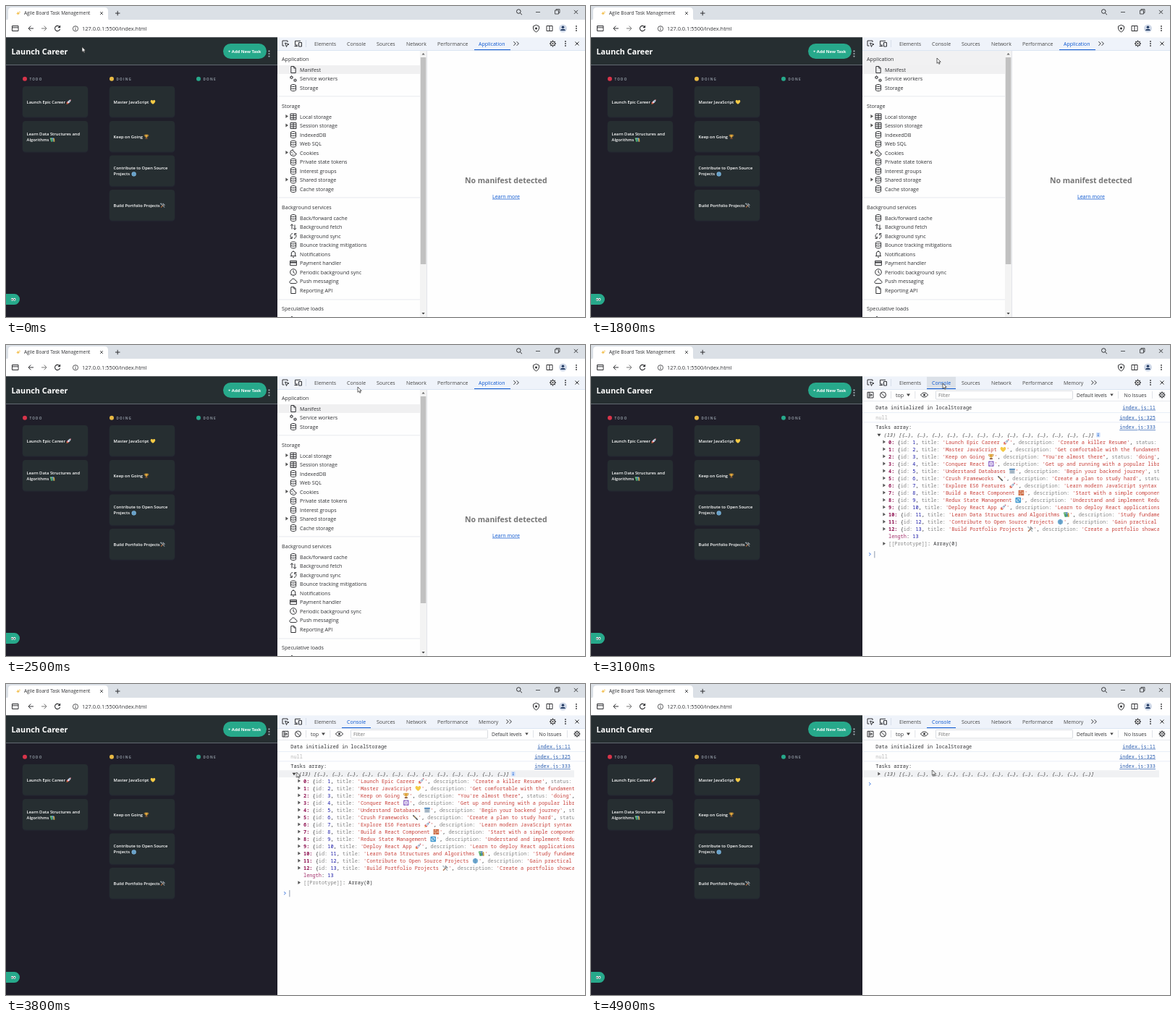
An HTML page for the animation above (5.1 s loop, 800 by 430 pixels).

```html
<!DOCTYPE html>
<html lang="en">
<head>
<meta charset="utf-8">
<title>Agile Board Task Management</title>
<style>
html, body { margin: 0; width: 100%; height: 100%; overflow: hidden; background: #fefefe; }
svg { display: block; width: 800px; height: 430px; }
text { font-family: "Open Sans", "Noto Sans", sans-serif; white-space: pre; }
.mono { font-family: "Noto Sans Mono", "DejaVu Sans Mono", monospace; }
</style>
</head>
<body>
<svg id="stage" viewBox="0 0 800 430" xmlns="http://www.w3.org/2000/svg"></svg>
<script>
const LOOP = 5100;
const INK = '#303134', BLUE = '#0b57d0', GREEN = '#27a98b', RULE = '#e1e4ea';
const MONO = 6.93, CELL = MONO * 0.6;
const SPLIT = 375, TOP = 43.5;

// Drawing helpers
const rect = (x, y, w, h, fill, extra = '') => `<rect x="${x}" y="${y}" width="${w}" height="${h}" fill="${fill}" ${extra}/>`;
const dot = (x, y, r, fill, extra = '') => `<circle cx="${x}" cy="${y}" r="${r}" fill="${fill}" ${extra}/>`;
const line = (d, color = INK, w = 1) => `<path d="${d}" fill="none" stroke="${color}" stroke-width="${w}"/>`;
const shape = (d, fill = INK) => `<path d="${d}" fill="${fill}"/>`;
const at = (x, y, body, scale = 1) => `<g transform="translate(${x} ${y}) scale(${scale})">${body}</g>`;
const text = (x, y, s, size = 7, fill = INK, extra = '') =>
  `<text x="${x}" y="${y}" font-size="${size}" fill="${fill}" ${extra}>${s}</text>`;
const mono = (x, y, s, fill = INK, extra = '') => text(x, y, s, MONO, fill, 'class="mono" ' + extra);
const span = (s, fill, extra = '') => `<tspan fill="${fill}" ${extra}>${s}</tspan>`;
const group = (id, body) => `<g id="${id}">${body}</g>`;

// Line icons, centred on 0,0
const icons = {
  doc: line('M-3-4.5H1L3.2-2.2V4.5H-3.2V-4.5M.8-4.3V-2H3'),
  db: line('M-3.6-3C-3.6-5 3.6-5 3.6-3V3C3.6 5-3.6 5-3.6 3ZM-3.6-3C-3.6-1 3.6-1 3.6-3M-3.6 0C-3.6 2 3.6 2 3.6 0'),
  table: line('M-4-4H4V4H-4ZM-4-1.4H4M-4 1.4H4M0-4V4'),
  gears: line('M-2.5-4.2V.6M-4.9-1.8H-.1M-4.2-3.5L-.8-.1M-.8-3.5L-4.2-.1', INK, .9) + dot(-2.5, -1.8, 1.5, '#fefefe', `stroke="${INK}"`) +
    line('M2.5 0V4.6M.2 2.3H4.8M.9.7L4.1 3.9M4.1.7L.9 3.9', INK, .9) + dot(2.5, 2.3, 1.3, '#fefefe', `stroke="${INK}"`),
  cookie: line('M-.5-4.3A4.4 4.4 0 1 0 4.3 1C2.6 1 2 0 2-1C.5-1-.5-2-.5-4.3Z') + dot(-2, -.6, .7, INK) + dot(-.6, 2, .7, INK) + dot(2, 2, .6, INK),
  updown: line('M-2 3V-3.6M-4-1.7L-2-3.8L0-1.7M2-3V3.6M0 1.7L2 3.8L4 1.7'),
  sync: line('M-1-3.5C-5-2.5-4.5 2-2 3.3M-4.5 3.3H-1.7V.7M1 3.5C5 2.5 4.5-2 2-3.3M4.5-3.3H1.7V-.7'),
  bell: line('M-4 2.7H4M-2.7 2.7V-1C-2.7-4.4 2.7-4.4 2.7-1V2.7M-.9 4.3H.9M0-4.7V-3.5'),
  card: line('M-4.4-3.2H4.4V3.2H-4.4Z') + rect(-4.4, -1.8, 8.8, 1.8, INK),
  clock: dot(0, 0, 4.3, 'none', `stroke="${INK}"`) + line('M0-2.6V.2L1.9 1.7'),
  cloud: line('M-3 3.1C-6 3-5.6-.7-3-.9C-2.4-4.3 2.3-4.2 2.8-.8C6-.6 5.5 3.1 3 3.1Z'),
  gear: line('M0-4.4V4.4M-4.4 0H4.4M-3.1-3.1L3.1 3.1M3.1-3.1L-3.1 3.1', INK, 1.4) + dot(0, 0, 2.9, '#fefefe', `stroke="${INK}"`) + dot(0, 0, 1.1, INK),
  kebab: [-3, 0, 3].map(y => dot(0, y, .9, INK)).join(''),
  close: line('M-2.5-2.5L2.5 2.5M2.5-2.5L-2.5 2.5'),
  more: line('M-3.6-2.8L-.8 0L-3.6 2.8M.6-2.8L3.4 0L.6 2.8'),
  eye: line('M-5 0C-2.5-4 2.5-4 5 0C2.5 4-2.5 4-5 0Z') + dot(0, 0, 1.5, INK),
  clear: dot(0, 0, 4, 'none', `stroke="${INK}"`) + line('M-2.8-2.8L2.8 2.8'),
  right: shape('M-1.6-2.4L2-0L-1.6 2.4Z', '#555'),
  down: shape('M-2.5-1.6H2.5L0 2Z', '#444')
};
const icon = (name, x, y, scale) => at(x, y, icons[name], scale);

// Pictograms in a box of 8 by 8, centred on 0,0
const emojis = {
  rocket: shape('M-3.8 1L-1.2-1L1 1.4L-1.4 3.6Z', '#d8394d') + shape('M-2.2.8C-1-2 1-3.6 3.8-3.8C3.7-1 2.2 1-.8 2.2Z', '#d3dbe4') +
    shape('M2-3.6L3.8-3.8L3.6-2Z', '#d8394d') + dot(1.3, -1.2, .8, '#4a86b8') + shape('M-3.8 3.8L-2.7 1.4L-1.4 2.7Z', '#f4a52e'),
  heart: shape('M0 3.7C-6-.2-3.7-3.4-1.8-3.2Q-.5-3.1 0-1.7Q.5-3.1 1.8-3.2C3.7-3.4 6-.2 0 3.7Z', '#f5ca45'),
  trophy: line('M-2-2.7H-3.5Q-3.4 0-1.4.2M2-2.7H3.5Q3.4 0 1.4.2', '#c58a35', .8) + shape('M-2.2-3.6H2.2Q2.2.6.6 1V2.4H-.6V1Q-2.2.6-2.2-3.6Z', '#dfa63c') + rect(-2, 2.2, 4, 1.6, '#7b4b32'),
  books: shape('M-4-2.7L-1-3.5L1 2.9L-2 3.6Z', '#49a765') + shape('M-1-3L1.6-3.6L3.4 2L.8 3.3Z', '#3c79b8') + shape('M1.5-2L3.5-2.4L4 3L2 3.5Z', '#caa344') + line('M-3-1.3L-.8-1.9M0-1.4L2-2', '#f2ead0', .7),
  globe: dot(0, 0, 3.6, '#8fc3e6') + line('M-3.6 0H3.6M0-3.6V3.6M-3-1.9Q0-1 3-1.9M-3 1.9Q0 1 3 1.9M0-3.6Q-3.6 0 0 3.6M0-3.6Q3.6 0 0 3.6', '#4482ae', .5),
  tools: line('M-2.8 3.3L1.7-1.6', '#a8663e', 1.4) + line('M0-3.2L3.4.1', '#8b98a2', 1.8) + line('M-2.5-2.5L3.2 3.3', '#9caab2', 1.2) + dot(-2.8, -2.8, 1, '#b4c0c7'),
  atom: rect(-3.8, -3.8, 7.6, 7.6, '#8d67c8', 'rx="1"') + [30, 90, 150].map(a => `<ellipse rx="3.1" ry="1.2" fill="none" stroke="#fff" stroke-width=".6" transform="rotate(${a})"/>`).join(''),
  cabinet: rect(-3.8, -3.4, 7.6, 7, '#c3d1dd', 'rx=".6"') + rect(-3.8, -3.4, 7.6, 1.8, '#4f8abf') + line('M-2.8 0H2.8M-2.8 2H2.8', '#728594', .7),
  pen: line('M-2.9-2.9L2.5 2.5', '#3e4246', 1.4) + shape('M1.5 3L3 1.5L3.8 3.8Z', '#3e4246') + line('M-1-1L.3.3', '#bc9650', 1.4),
  bricks: rect(-3.8, -3.6, 7.6, 7.2, '#c9613b') + line('M-3.8-1.2H3.8M-3.8 1.2H3.8M-1-3.6V-1.2M2-1.2V1.2M-1 1.2V3.6', '#f1cfb6', .7),
  cycle: rect(-3.8, -3.8, 7.6, 7.6, '#459bd0', 'rx="1"') + line('M-2-1V1.7H1M2 1V-1.7H-1', '#fff', .9),
  spark: shape('M-.5-3.5L.5-.8L3.3.2L.5 1.2L-.5 3.8L-1.4 1.2L-4 .2L-1.4-.8Z', '#f2bc45') + shape('M2.5-4L3-2.8L4.2-2.3L3-1.8L2.5-.6L2-1.8L.9-2.3L2-2.8Z', '#f2bc45')
};
const emoji = (name, x, y, scale = 1) => at(x, y, emojis[name], scale);

function browser() {
  return rect(0, 0, 800, 20, '#dbe0e6') + shape('M0 20Q3 20 3 16V7Q3 2 8 2H136Q141 2 141 7V16Q141 20 144 20Z', '#fff') +
    rect(0, 19, 800, 25, '#fff') + emoji('spark', 17, 10, .75) + text(25, 12.4, 'Agile Board Task Management', 6.5) +
    icon('close', 132, 10, .8) + line('M151 10H157.5M154.2 6.8V13.2') +
    dot(708.3, 7.5, 2.8, 'none', `stroke="${INK}"`) + line('M710.3 9.6L713 12.2') +
    line('M732 8.5H738M758.5 6H763.5V11H758.5ZM760 6V4.5H765V9.5H763.5', INK, .8) + icon('close', 787.5, 8.3) +
    line('M8.5 27.5H17V34.5H8.5ZM8.5 29.8H17') + line('M38 31H31M34.3 27.6L31 31L34.3 34.4') +
    line('M49 31H56M52.7 27.6L56 31L52.7 34.4', '#777') + line('M74 28.8A3.6 3.6 0 1 0 74.6 32M74.6 27V29.6H72', INK, 1.1) +
    dot(96, 31.3, 3.6, 'none', `stroke="${INK}" stroke-width=".8"`) + line('M96 30.8V33.4M96 28.9V29.8', INK, .9) +
    text(105, 34, '127.0.0.1:5500/index.html', 7.4) +
    line('M732.5 26.3L736.5 28V31Q736.3 34.3 732.5 36Q728.7 34.3 728.5 31V28Z') + dot(732.5, 31, 1.5, INK) +
    line('M747 27.5H755V34.5H747ZM751 27.5V34.5') + dot(769.5, 31, 5.5, '#d0d9e8') + dot(769.5, 29.3, 1.8, '#273f66') +
    shape('M765.8 34Q766.5 31.8 769.5 31.8Q772.5 31.8 773.2 34Z', '#273f66') + icon('kebab', 788, 31);
}

const cards = [
  [23, 111, ['Launch Epic Career'], 'rocket', 86.5],
  [23, 159, ['Learn Data Structures and', 'Algorithms'], 'books', 64],
  [143, 111, ['Master JavaScript'], 'heart', 203],
  [143, 159, ['Keep on Going'], 'trophy', 194],
  [143, 206.5, ['Contribute to Open Source', 'Projects'], 'globe', 176.7],
  [143, 254, ['Build Portfolio Projects'], 'tools', 216.5]
];

function card([x, y, lines, pic, picX]) {
  const top = y + 21.5 - (lines.length - 1) * 4.2;
  return rect(x - .5, y + .8, 91, 43, '#222630', 'rx="4.5"') + rect(x, y, 90, 42.5, '#262e31', 'rx="4"') +
    lines.map((s, i) => text(x + 5.6, top + 2.2 + i * 8.4, s, 5.8, '#fff', 'font-weight="600"')).join('') +
    emoji(pic, picX, top + (lines.length - 1) * 8.4 + .2, .85);
}

function board() {
  const columns = [[26, 'TODO', '#d8344a'], [146, 'DOING', '#e8b944'], [266, 'DONE', GREEN]];
  return rect(0, TOP, SPLIT, 430 - TOP, '#1f1e29') + rect(0, TOP, SPLIT, 81 - TOP, '#262e31') + rect(0, 81, SPLIT, 1, '#626970') +
    text(7.5, 66.6, 'Launch Career', 10.8, '#fff', 'font-weight="700"') +
    rect(300, 52, 60, 21, GREEN, 'rx="10.5"') + text(307, 64.7, '+ Add New Task', 5.85, '#fff', 'font-weight="700"') +
    [62.4, 66, 69.6].map(y => dot(363.5, y, 1.1, '#a3adb5')).join('') +
    columns.map(([x, s, c]) => dot(x, 100.7, 3, c) +
      text(x + 6.5, 102.5, s, 4.6, '#8b949e', 'font-weight="700" letter-spacing="1.2"')).join('') +
    cards.map(card).join('') + shape('M0 398H11.5A7.5 7.5 0 0 1 11.5 413H0Z', GREEN) +
    [8.6, 11.8].map(x => `<ellipse cx="${x}" cy="405.7" rx="1.6" ry="2" fill="#fff"/>` + dot(x - .2, 405.9, .9, '#263d3a')).join('');
}

function tabBar(tabs, active, from, to, moreX) {
  return tabs.map(([x, s]) => text(x, 54.8, s, 7, s === active ? BLUE : '#474747')).join('') +
    rect(from, 60, to - from, 1, BLUE) + icon('more', moreX, 52);
}
const commonTabs = [[426, 'Elements'], [471, 'Console'], [512, 'Sources'], [553, 'Network'], [596, 'Performance']];

function toolFrame() {
  const width = 800 - SPLIT;
  return rect(SPLIT, TOP, width, 430 - TOP, '#fefefe') + rect(SPLIT, TOP, width, 61 - TOP, '#eff3fa') + rect(SPLIT, 61, width, .8, '#d3dfef') +
    line('M389 50V48H382V55H384.5M385.5 51L391 53L388.5 54L387.5 56.5Z') + line('M407 48.3H399.5V54H403M398.5 55.5H403M404.5 50.5H408.5V56H404.5Z') +
    rect(414, 47, .7, 10, '#cdd5e2') + icon('gear', 755.5, 52) + icon('kebab', 773, 52) + icon('close', 789, 52);
}

const sections = [
  ['Application', 73, ['doc Manifest', 'gears Service workers', 'db Storage']],
  ['Storage', 138, ['table+ Local storage', 'table+ Session storage', 'db IndexedDB', 'db Web SQL', 'cookie+ Cookies',
    'db Private state tokens', 'db Interest groups', 'db+ Shared storage', 'db Cache storage']],
  ['Background services', 278, ['db Back/forward cache', 'updown Background fetch', 'sync Background sync', 'db Bounce tracking mitigations',
    'bell Notifications', 'card Payment handler', 'clock Periodic background sync', 'cloud Push messaging', 'doc Reporting API']],
  ['Speculative loads', 418, ['updown ']]
];

function section([title, y, items]) {
  return text(381, y + 2.6, title, 7.2, INK, 'font-weight="500"') + items.map((item, i) => {
    const [, kind, opens, label] = item.match(/^(\w+)(\+?) (.*)$/), rowY = y + 15 + i * 12.5;
    return (opens ? icon('right', 388, rowY - .5) : '') + icon(kind, 397, rowY) + text(406, rowY + 2.6, label, 7.15);
  }).join('');
}

function applicationPanel() {
  const width = 572 - SPLIT;
  return tabBar([...commonTabs, [653, 'Application']], 'Application', 647, 697, 705) +
    rect(SPLIT, 82, width, 12, '#f0f0f1') + group('headHover', rect(SPLIT, 62, width, 20, '#f1f1f2')) +
    [124.5, 264.5, 405.5].map(y => rect(SPLIT, y, width, .8, RULE)).join('') + sections.map(section).join('') +
    rect(572, 62, 9, 368, '#f3f3f3') + rect(572.8, 71, 7.5, 286, '#c1c1c1') +
    shape('M574.5 67.5H578.7L576.6 65Z', '#666') + shape('M574.5 424H578.7L576.6 426.5Z', '#444') + rect(581, 62, .8, 368, '#dcdfe4') +
    text(634, 244.8, 'No manifest detected', 10.5, '#757575', 'font-weight="700"') +
    text(672, 265.7, 'Learn more', 7, BLUE, 'text-decoration="underline"');
}

const tasks = [
  ['Launch Epic Career', 'rocket', "'Create a killer Resume'"],
  ['Master JavaScript', 'heart', "'Get comfortable with the fundamentals'"],
  ['Keep on Going', 'trophy', '"You\'re almost there"', "'doing'"],
  ['Conquer React', 'atom', "'Get up and running with a popular library'"],
  ['Understand Databases', 'cabinet', "'Begin your backend journey'"],
  ['Crush Frameworks', 'pen', "'Create a plan to study hard'"],
  ['Explore ES6 Features', 'rocket', "'Learn modern JavaScript syntax and features'"],
  ['Build a React Component', 'bricks', "'Start with a simple component'"],
  ['Redux State Management', 'cycle', "'Understand and implement Redux'"],
  ['Deploy React App', 'rocket', "'Learn to deploy React applications'"],
  ['Learn Data Structures and Algorithms', 'books', "'Study fundamentals'"],
  ['Contribute to Open Source Projects', 'globe', "'Gain practical experience'"],
  ['Build Portfolio Projects', 'tools', "'Create a portfolio showcase'"]
];

function taskRow([title, pic, about, status = ''], i) {
  const y = 134.2 + i * 10.03, key = '#858585', str = '#c8403a', plum = '#8e1050';
  const lead = `${i}: {id: ${i + 1}, title: '${title} `;
  return icon('right', 405, y - .3) + mono(411, y + 2.4,
    span(`${i}: `, plum, 'font-weight="700"') + span('{', INK) + span('id: ', key) + span(i + 1, '#1a1aa6') + span(', ', INK) +
    span('title: ', key) + span(`'${title} `, str) + span("'", str, 'dx="9.3"') + span(', ', INK) + span('description: ', key) +
    span(about, str) + span(', ', INK) + span('status: ', key) + span(status, str) + span(',', INK)) +
    emoji(pic, 411 + lead.length * CELL + 4.6, y);
}

function consolePanel() {
  const width = 800 - SPLIT;
  const logs = [[86.3, 'Data initialized in localStorage', 11], [100.2, 'null', 325], [114, 'Tasks array:', 333]];
  const preview = '(13) [' + Array(13).fill('{…}').join(', ') + ']';
  const prompt = y => line(`M384 ${y - 2}L386.5 ${y}L384 ${y + 2}`, '#4d83e0');
  return group('tabHover', rect(464, 44, 40, 16, '#dce1e8')) +
    tabBar([...commonTabs, [653, 'Memory']], 'Console', 464, 504, 695) +
    rect(SPLIT, 77, width, .8, RULE) + line('M382 65.3H390V73H382ZM384.3 65.3V73M386 67.5L388.5 69.2L386 71Z') + icon('clear', 403.5, 69) +
    text(421, 71.7, 'top') + icon('down', 438.5, 69) + rect(447.5, 64, .7, 10, '#d3d7de') + rect(414, 64, .7, 10, '#d3d7de') + icon('eye', 460.5, 69) +
    rect(476.5, 63.3, 189, 11.7, '#fff', 'stroke="#d0d4da" stroke-width=".8" rx="1"') + text(480, 71.8, 'Filter', 6.9, '#777') +
    text(671, 71.6, 'Default levels', 6.7) + icon('down', 719.5, 69, .9) + rect(728, 64, .7, 10, '#d3d7de') +
    text(736.5, 71.6, 'No Issues', 6.9) + rect(775, 64, .7, 10, '#d3d7de') + icon('gear', 789, 69) +
    [93, 106.5].map(y => rect(SPLIT, y, width, .8, '#e3eaf5')).join('') +
    group('rowHover', rect(SPLIT, 119.3, 785 - SPLIT, 9.8, '#f0f1f3')) +
    logs.map(([y, s, n]) => mono(393.3, y + 2.4, s, s === 'null' ? '#b8b8b8' : INK) +
      mono(780, y + 2.4, `index.js:${n}`, '#2a5db0', 'text-anchor="end" text-decoration="underline"')).join('') +
    mono(404, 126.8, preview, '#444', 'font-style="italic"') +
    group('open', icon('down', 398, 124.4) + rect(698, 121, 5.6, 6.6, '#cbdcf8', 'rx="1"') + line('M700.8 123.7V126.4M700.8 122V122.9', BLUE, .9) +
      `<g clip-path="url(#rows)">${tasks.map(taskRow).join('')}</g>` +
      mono(411, 267.1, span('length', '#a12d69') + span(': ', INK) + span('13', '#1a1aa6')) +
      icon('right', 405, 274.6) + mono(411, 277.1, span('[[Prototype]]', '#858585') + span(': Array(0)', INK)) +
      prompt(289.3) + group('caret', rect(391.4, 285, .9, 9.3, '#8290a4'))) +
    group('closed', icon('right', 398, 124.2) + prompt(138.2));
}

const pointer = '<path d="M0 0V7.3L1.7 5.8L2.9 8.3L4.1 7.7L2.9 5.3H5.2Z" fill="#fff" stroke="#222" stroke-width=".7"/>';
document.getElementById('stage').innerHTML = '<clipPath id="rows"><path d="M376 80H785V300H376Z"/></clipPath>' +
  browser() + board() + toolFrame() + group('elementsHover', rect(420, 44, 42, 16, '#e5e9f0')) +
  group('application', applicationPanel()) + group('console', consolePanel()) + group('pointer', pointer);

// Each track is a list of [ms, value] pairs; every value holds until the next.
function play(id, prop, steps) {
  const frames = steps.map(([ms, v]) => ({ offset: ms / LOOP, [prop]: v, easing: 'step-end' }));
  frames.push({ offset: 1, [prop]: steps[steps.length - 1][1] });
  document.getElementById(id).animate(frames, { duration: LOOP, iterations: Infinity });
}
const show = (id, ...steps) => play(id, 'opacity', [[0, 0], ...steps]);

const path = [
  [0, 105, 56.5], [100, 405, 58], [1200, 432, 56], [1300, 446, 59], [1400, 459, 63], [1500, 468, 67],
  [1700, 474, 70], [1800, 478, 72], [2100, 481, 73], [2200, 483, 73], [2300, 484.5, 73], [2500, 486, 58], [2600, 486, 53],
  [3200, 474, 66], [3300, 451, 86], [3400, 427, 105], [3500, 409, 117], [3600, 402, 121], [3800, 401.5, 122],
  [3900, 400, 123], [4000, 398.5, 124], [4100, 397.5, 124], [4500, 412, 123], [4600, 445, 121], [4900, 471.5, 119]
];
play('pointer', 'transform', path.map(([ms, x, y]) => [ms, `translate(${x}px, ${y}px)`]));
play('application', 'opacity', [[0, 1], [2600, 0]]);
show('console', [2600, 1]);
show('elementsHover', [1200, 1], [1400, 0]);
show('headHover', [1500, 1], [2500, 0]);
show('tabHover', [2600, 1], [3200, 0]);
show('rowHover', [3600, 1]);
show('caret', [2600, 1], [3600, 0], [3800, 1], [4300, 0]);
play('open', 'opacity', [[0, 1], [4400, 0]]);
show('closed', [4400, 1]);
</script>
</body>
</html>
```
